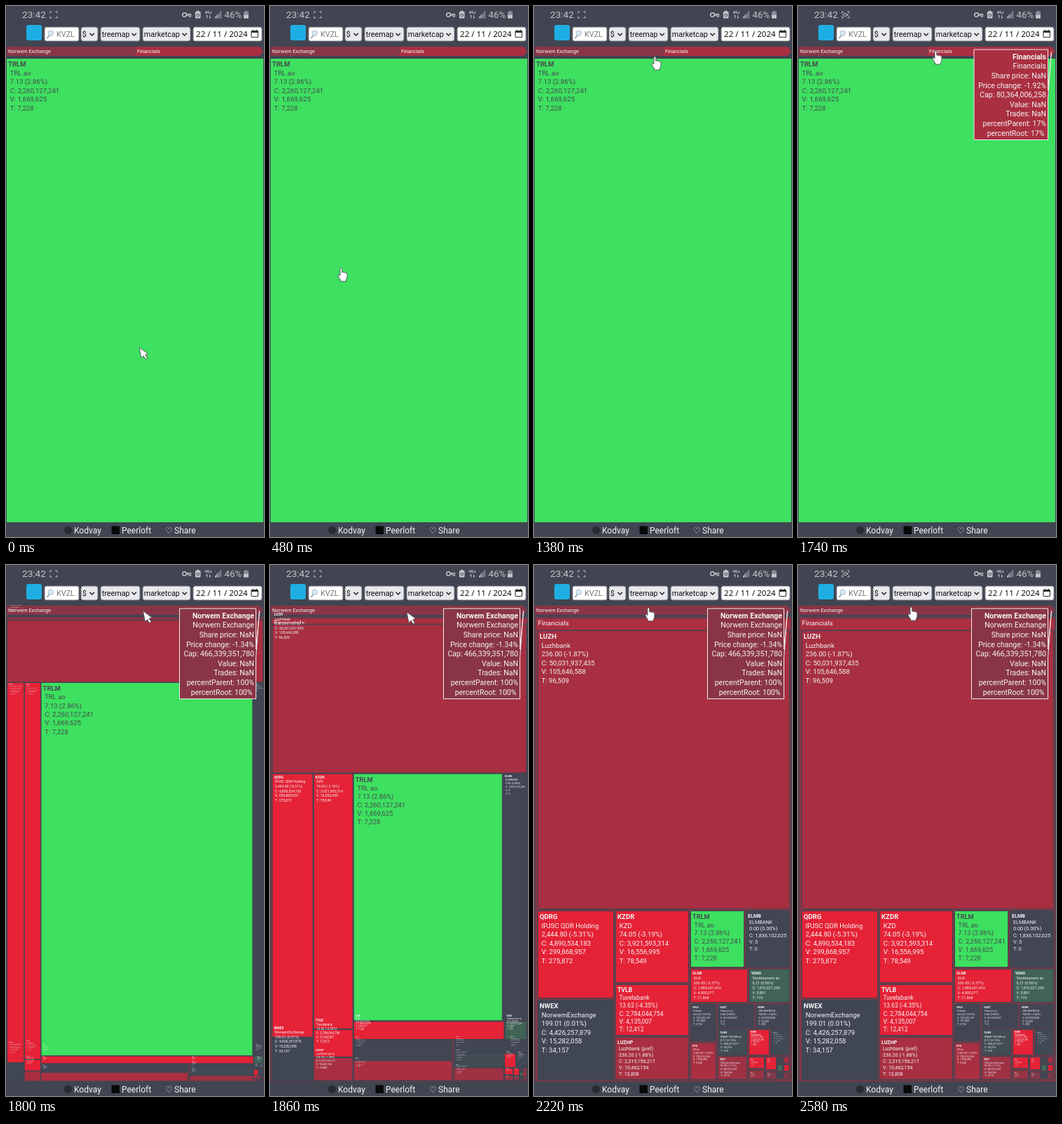
An HTML page with a canvas for the animation above (2.7 s loop, 368 by 756 pixels).

```html
<!DOCTYPE html>
<html lang="en">
<head>
<meta charset="utf-8">
<title>Market treemap</title>
<style>
html, body { margin: 0; width: 100%; height: 100%; overflow: hidden; background: #414551; }
canvas { display: block; width: 368px; height: 756px; }
</style>
</head>
<body>
<canvas id="stage"></canvas>
<script>
const W = 368, H = 756, LOOP = 2700, STEP = 60, LAST = 2580;
const ZOOM_AT = 1800;
const BG = '#414551', INK = '#454a50', WHITE = '#f4f4f5', PALE = '#c4c6cb', DIM = '#858993';
const FLAT = [65, 69, 84], UP = [61, 232, 96], DOWN = [229, 34, 54];
const SANS = 'Roboto, sans-serif';
const VIEW = [1, 75, 367, 735];
const HOME = [224, 493, 299, 572];

const mix = (a, b, k) => a + (b - a) * k;
const clamp = v => Math.max(0, Math.min(1, v));
const ease = k => (1 - Math.cos(Math.PI * clamp(k))) / 2;

// Price change in percent to colour, saturated at 3 %.
function heat(change) {
  const end = change < 0 ? DOWN : UP, k = clamp(Math.abs(change) / 3);
  return `rgb(${FLAT.map((v, i) => Math.round(mix(v, end[i], k)))})`;
}
const MARKET = heat(-1.34), SECTOR = heat(-1.92);

function tile(box, change, ticker, name, price, cap, value, trades) {
  const lines = ticker
    ? [ticker, name, `${price} (${change.toFixed(2)}%)`, 'C: ' + cap, 'V: ' + value, 'T: ' + trades]
    : [];
  return { box, fill: heat(change), lines };
}

const tiles = [
  tile([6, 94, 364, 489], -1.87, 'LUZH', 'Luzhbank', '236.00', '50,031,937,435', '105,646,588', '96,509'),
  tile([6, 493, 113, 616], -5.31, 'QDRG', 'IPJSC QDR Holding', '2,444.80', '4,890,534,183', '299,868,957', '275,872'),
  tile([6, 620, 113, 732], 0.01, 'NWEX', 'NorwemExchange', '199.01', '4,426,257,879', '15,282,058', '34,157'),
  tile([117, 493, 220, 594], -3.19, 'KZDR', 'KZD', '74.05', '3,921,593,314', '16,556,995', '78,549'),
  tile([117, 598, 220, 669], -4.35, 'TVLB', 'Tuvelabank', '13.62', '2,784,044,754', '4,135,007', '12,412'),
  tile([117, 673, 220, 732], -1.88, 'LUZHP', 'Luzhbank (pref)', '236.20', '2,319,156,217', '10,462,154', '13,808'),
  tile(HOME, 2.86, 'TRLM', 'TRL ao', '7.13', '2,260,127,241', '1,669,625', '7,228'),
  tile([303, 493, 364, 572], 0, 'ELMB', 'ELMBANK', '0.00', '1,836,102,025', '0', '0'),
  tile([224, 576, 304, 622], -3.27, 'GLNB', 'GLN', '326.45', '1,484,331,410', '4,000,377', '11,568'),
  tile([308, 576, 364, 622], 0.56, 'VDNS', 'Verdinsurans ao', '0.21', '1,019,321,256', '5,891', '170'),
  tile([224, 626, 259, 677], -0.01, 'ORLS', 'Orlevan', '622.60', '725,549,129', '767,080', '5,753'),
  tile([224, 681, 259, 732], -1.92, 'DFN', 'DF ao', '1,429.20', '700,616,264', '1,282,496', '6,546'),
  tile([263, 626, 313, 659], 0, 'HAZC', 'Hazcon ao', '0.00', '661,294,251', '0', '0'),
  tile([317, 626, 364, 659], -0.02, 'ENDR', 'JSB ENDROVA', '798.00', '635,020,042', '22,926', '402'),
  tile([263, 662, 303, 697], 0.12, 'TLBN', 'BANK TELBIN ao', '0.17', '602,417,617', '34,576', '165'),
  tile([263, 700, 303, 732], -1.71, 'VEKI', 'Vekona Insurance', '92.30', '506,231,822', '184,230', '2,214'),
  tile([307, 662, 335, 697], -3.7, 'KDMB', 'Kadimbank', '21.70', '347,210,388', '90,112', '604'),
  tile([339, 662, 364, 697], 0.08, 'ZUVT', 'Zuvat ao', '0.10', '251,908,114', '11,020', '98'),
  tile([307, 701, 328, 716], -3.1, 'PELN', 'Pelnor', '11.20', '140,221,008', '8,211', '77'),
  tile([331, 701, 345, 718], -3.4, 'MIVR', 'Mivar', '4.10', '98,410,552', '7,100', '61'),
  tile([307, 720, 328, 732], -1.6, 'SOLT', 'Soltev', '7.50', '90,310,204', '5,040', '52'),
  tile([331, 722, 345, 732], -1.2, 'BRIN', 'Brinda', '2.20', '61,208,430', '3,310', '40')
];
// small leftovers in the corner
[0, -1.9, 0.8, -3, 0, -1.3].forEach((change, i) => {
  const x = 348 + (i % 2) * 9, y = 701 + (i >> 1) * 11;
  tiles.push(tile([x, y, x + 6, y + 8], change));
});

const marketTip = tipLines('Norwem Exchange', '-1.34%', '466,339,351,780', '100%');
const sectorTip = tipLines('Financials', '-1.92%', '80,364,006,258', '17%');

// time, x, y of the pointer tip
const path = [
  [0, 190, 486], [300, 101, 373], [960, 101, 373], [1380, 172, 72], [1560, 174, 71],
  [1740, 196, 64], [1860, 195, 67], [1980, 181, 68], [2280, 161, 60], [LOOP, 161, 60]
];

const canvas = document.getElementById('stage');
const g = canvas.getContext('2d');
const ratio = window.devicePixelRatio || 1;
canvas.width = W * ratio;
canvas.height = H * ratio;

function tipLines(name, change, cap, share) {
  return [name, name, 'Share price: NaN', 'Price change: ' + change, 'Cap: ' + cap,
    'Value: NaN', 'Trades: NaN', 'percentParent: ' + share, 'percentRoot: ' + share + ' '];
}

function text(s, x, y, size, color = WHITE, opt = {}) {
  g.font = `${opt.weight || 400} ${size}px ${opt.font || SANS}`;
  g.textAlign = opt.align || 'left';
  g.textBaseline = 'alphabetic';
  g.fillStyle = color;
  g.fillText(s, x, y + size * 0.355);
}

function rect(x0, y0, x1, y1, fill) {
  g.fillStyle = fill;
  g.fillRect(x0, y0, x1 - x0, y1 - y0);
}

function round(x0, y0, x1, y1, r, fill, line) {
  g.beginPath();
  g.roundRect(x0, y0, x1 - x0, y1 - y0, r);
  g.fillStyle = fill;
  g.fill();
  if (line) stroke(line, 1);
}

function stroke(color, width) {
  g.strokeStyle = color;
  g.lineWidth = width;
  g.stroke();
}

function poly(points, open) {
  g.beginPath();
  points.forEach(([x, y]) => g.lineTo(x, y));
  if (!open) g.closePath();
}

function fillPoly(points, fill) {
  poly(points);
  g.fillStyle = fill;
  g.fill();
}

function line(points, color, width) {
  poly(points, true);
  stroke(color, width);
}

function statusBar(t) {
  text('23:42', 23, 12.6, 13.6, PALE);
  for (const [sx, sy] of [[-1, -1], [1, -1], [1, 1], [-1, 1]]) {
    const x = 67.8 + sx * 5, y = 12.5 + sy * 4.5;
    line([[x - sx * 2.5, y], [x, y], [x, y - sy * 2.5]], PALE, 1);
  }
  if (t % 900 >= 600) {
    g.beginPath();
    g.roundRect(64.8, 10.5, 4.2, 4, 1);
    stroke(PALE, 1);
    fillPoly([[69, 12.5], [71.3, 10.7], [71.3, 14.3]], PALE);
  }
  g.beginPath();
  g.arc(254.5, 12.5, 2.7, 0, 7);
  stroke(PALE, 1.4);
  line([[257.5, 11.6], [263.5, 11.6], [263.5, 15], [261, 15], [261, 13.4], [257.5, 13.4]], PALE, 1.1);
  round(270, 8, 277.5, 17.5, 1.2, PALE);
  rect(272, 6.8, 275.5, 8, PALE);
  g.beginPath();
  g.arc(273.8, 13, 1.9, 0, 7);
  stroke(BG, 1);
  text('4G+', 283.5, 9.2, 5.8, PALE, { weight: 700 });
  line([[286.8, 17.5], [286.8, 13], [285, 14.8]], PALE, 1);
  line([[290.6, 13], [290.6, 17.5], [292.4, 15.7]], PALE, 1);
  for (let i = 0; i < 4; i++) rect(298 + i * 2.5, 15 - i * 2.6, 299.7 + i * 2.5, 17.5, i < 2 ? PALE : DIM);
  text('46%', 311.5, 12.6, 13.4, PALE);
  round(339, 8, 346, 17.5, 1, DIM);
  rect(341, 7, 344, 8.3, DIM);
  rect(339, 12.7, 346, 17.5, PALE);
}

function select(x0, x1, label) {
  round(x0, 30, x1, 50, 3, '#e9e9ed', '#777a82');
  text(label, x0 + 1.7, 40.3, 10.8, '#111');
  line([[x1 - 11.5, 38.8], [x1 - 8.3, 42], [x1 - 5.1, 38.8]], '#222', 1.5);
}

function toolbar() {
  rect(0, 24.5, W, 25, '#3a3e49');
  round(29, 27, 51, 49, 3, '#1eaee4');
  round(55, 30, 104, 50, 2.5, '#fff', '#777a82');
  line([[61.5, 42], [58.5, 46]], '#9a9da8', 1.8);
  g.beginPath();
  g.arc(63.8, 38.6, 3.6, 0, 7);
  g.fillStyle = '#d5ebf8';
  g.fill();
  stroke('#a9bccb', 1.1);
  text('KVZL', 72, 40.3, 10.8, '#777');
  select(107, 131, '$');
  select(135, 191, 'treemap');
  select(195, 263, 'marketcap');
  round(267, 30, 365, 50, 2.5, '#fff', '#777a82');
  text('22 / 11 / 2024', 271, 40.3, 11.6, '#111', { font: '"Noto Sans", sans-serif' });
  g.beginPath();
  g.roundRect(350, 35.5, 9.5, 9, 1);
  stroke('#333', 1.1);
  rect(350, 35, 359.5, 38, '#333');
  rect(351.5, 33.8, 352.8, 36, '#333');
  rect(356.7, 33.8, 358, 36, '#333');
}

function footer() {
  rect(0, 736, W, H, BG);
  g.beginPath();
  g.arc(88.7, 746.3, 5.6, 0, 7);
  g.fillStyle = '#272b31';
  g.fill();
  text('Kodvay', 97, 746.5, 12);
  rect(150.5, 740.5, 162, 752, '#08090b');
  text('Peerloft', 165, 746.5, 12);
  text('♡', 227, 746.5, 12, WHITE, { font: '"DejaVu Sans", sans-serif' });
  text('Share', 240, 746.5, 12);
}

function crumb(x0, x1, fill, label, notch) {
  const points = [[x0, 58], [x1 - 5.5, 58], [x1, 64.5], [x1 - 5.5, 71], [x0, 71]];
  if (notch) points.push([x0 + 5.5, 64.5]);
  fillPoly(points, fill);
  text(label, notch ? x0 + 6 : x0 + 2, 64.5, 7.3);
}

function breadcrumbs(zoomed) {
  crumb(1, zoomed ? 367 : 185.5, MARKET, 'Norwem Exchange');
  if (!zoomed) crumb(181, 367, SECTOR, 'Financials', true);
}

const fontSize = b => Math.min(9.6, (b[3] - b[1] - 4) / 7.8, (b[2] - b[0] - 8) / 7.35);
const labelY = (b, size) => b[1] + 1.5 + 0.65 * size;

// Tiles outside the open one grow from the nearest edge of the view.
function edge(v, axis) {
  if (v <= HOME[axis]) return VIEW[axis];
  return v >= HOME[axis + 2] ? VIEW[axis + 2] : v;
}

function drawLabel(tl, from, k) {
  const end = fontSize(tl.box), home = tl.box === HOME;
  const flat = from[3] - from[1] < 1;
  const startY = home ? labelY(from, fontSize(from)) : from[1] - (flat ? 4.27 * end : 0);
  const size = mix(home ? fontSize(from) : 0, end, k);
  if (size < 0.4) return;
  const x = mix(from[0], tl.box[0], k) + 2;
  const y = mix(startY, labelY(tl.box, end), k);
  const color = home ? INK : WHITE;
  tl.lines.forEach((s, i) =>
    text(s, x + (i ? 0.28 * size : 0), y + i * 1.3 * size, size, color, { weight: i ? 400 : 700 }));
}

function treemap(k) {
  const shown = k > 0 ? tiles : tiles.filter(tl => tl.box === HOME);
  g.save();
  g.beginPath();
  g.rect(0, 57, W, 679);
  g.clip();
  if (k > 0) {
    rect(1, 74, 367, 735.5, MARKET);
    rect(2, 75, 366, 734.5, BG);
    rect(3, 76, 365.5, 734, SECTOR);
    text('Financials', 5.5, 83, 9.8);
  }
  const starts = shown.map(tl => tl.box.map((v, i) => edge(v, i % 2)));
  shown.forEach((tl, i) => {
    const b = tl.box.map((v, j) => mix(starts[i][j], v, k));
    rect(b[0] - 1.5, b[1] - 1.5, b[2] + 1.5, b[3] + 1.5, BG);
    rect(...b, tl.fill);
  });
  shown.forEach((tl, i) => drawLabel(tl, starts[i], k));
  g.restore();
}

function tooltip(lines, left, fill) {
  poly([[left, 62], [356.5, 62], [356.5, 120], [361.5, 65], [356.5, 132], [356.5, 190.5], [left, 190.5]]);
  g.fillStyle = fill;
  g.fill();
  stroke('#ececee', 1);
  lines.forEach((s, i) =>
    text(s, 354, 72 + i * 13.6, 10.5, WHITE, { align: 'right', weight: i ? 400 : 700 }));
}

const arrow = new Path2D('M0 0L3 15.5L6 12L9.2 17L11.6 15.4L8.6 10.6L13 9.6Z');
const hand = new Path2D('M-1 1.4Q-1 0 .4 0Q1.8 0 1.8 1.4V6.2Q3.2 5 4.2 6.4Q5.6 5.4 6.6 7Q8.6 6.2 9 8.4' +
  'V12.5Q8.8 15 7.4 16.5V19H-.4V17Q-3 14 -4 10.8Q-4 9 -2.4 9.4L-1 11Z');

function pointerAt(t) {
  const i = path.findIndex((p, n) => n && t <= p[0]);
  const [t0, x0, y0] = path[i - 1], [t1, x1, y1] = path[i];
  const k = ease((t - t0) / (t1 - t0));
  return [mix(x0, x1, k), mix(y0, y1, k)];
}

function pointer(t, x, y) {
  const pointing = (t >= 300 && t < ZOOM_AT) || t >= 2100;
  const shape = pointing ? hand : arrow;
  g.save();
  g.translate(x, y);
  g.globalAlpha = mix(0.33, 1, clamp(Math.abs(t - 840) / 120));
  g.lineJoin = 'round';
  g.fillStyle = '#fff';
  g.fill(shape);
  g.strokeStyle = '#4a4e55';
  g.lineWidth = 0.9;
  g.stroke(shape);
  g.restore();
}

function draw(t) {
  g.setTransform(ratio, 0, 0, ratio, 0, 0);
  rect(0, 0, W, H, BG);
  const zoomed = t >= ZOOM_AT;
  const [x, y] = pointerAt(t);
  statusBar(t);
  toolbar();
  breadcrumbs(zoomed);
  treemap(zoomed ? ease((t - 1710) / 288) : 0);
  footer();
  if (zoomed) tooltip(marketTip, 247.5, MARKET);
  else if (x > 184 && y < 71) tooltip(sectorTip, 251, SECTOR);
  pointer(t, x, y);
}

const began = performance.now();
function tick() {
  const t = (performance.now() - began) % LOOP;
  draw(Math.min(LAST, Math.floor(t / STEP) * STEP));
  requestAnimationFrame(tick);
}
tick();
</script>
</body>
</html>
```
